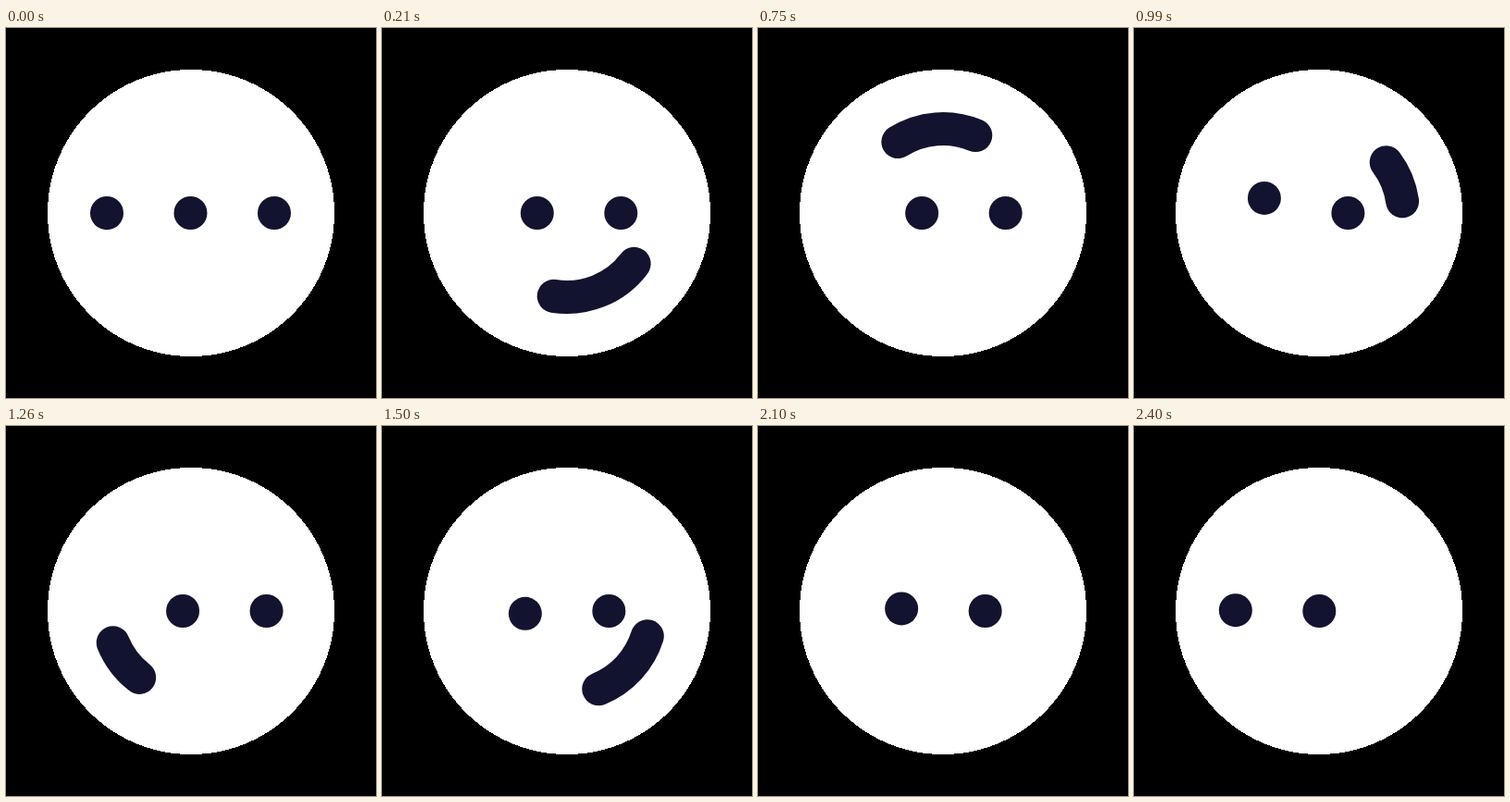
An HTML page for the animation above (4460 ms loop, 400 by 400 pixels).

```html
<!DOCTYPE html>
<html lang="en">
<head>
<meta charset="utf-8">
<title>Juggling dots</title>
<style>
  html, body { margin: 0; width: 100%; height: 100%; overflow: hidden; background: #000; }
  svg { display: block; width: 100vw; height: 100vh; }
</style>
</head>
<body>
<svg viewBox="0 0 400 400">
  <path id="disc" fill="#fff" shape-rendering="crispEdges"/>
  <g fill="#12132f">
    <circle id="left" r="18"/>
    <circle id="right" r="18" cy="200"/>
  </g>
  <path id="arc" fill="none" stroke="#12132f" stroke-width="36" stroke-linecap="round"/>
</svg>
<script>
const LOOP = 4460, TICK = 30, LAST = 80;
const MID = 200, R = 91, DISC = 155;
const START = 0.011, STEP = 0.04982; // throws per tick
const THROWS = 3;                    // the fourth pass has no dot in the air

// Degrees travelled along the half circle, by progress of one throw
const FRONT = [[0.012, 0], [0.103, 52], [0.36, 143], [0.655, 172], [0.908, 179.8], [1, 180]];
const BACK = [[0.012, 0], [0.103, 22], [0.36, 81], [0.655, 143], [0.804, 163], [0.908, 175.6], [0.95, 178.6], [1, 180]];

const [disc, left, right, arc] =
  ["disc", "left", "right", "arc"].map(id => document.getElementById(id));

// Hard-edged disc built from whole pixel rows
function rows(r) {
  let d = "";
  for (let y = -r; y < r; y++) {
    const half = Math.round(Math.sqrt(r * r - (y + 0.5) ** 2));
    d += `M${MID - half} ${MID + y}h${2 * half}v1h${-2 * half}z`;
  }
  return d;
}

// Smooth curve through points, flat at both ends
function curve(pts, x) {
  const n = pts.length - 1;
  if (x <= pts[0][0]) return pts[0][1];
  if (x >= pts[n][0]) return pts[n][1];
  const slope = i => i === 0 || i === n ? 0 :
    (pts[i + 1][1] - pts[i - 1][1]) / (pts[i + 1][0] - pts[i - 1][0]);
  let i = 0;
  while (x > pts[i + 1][0]) i++;
  const [x0, y0] = pts[i], [x1, y1] = pts[i + 1];
  const h = x1 - x0, u = (x - x0) / h, v = 1 - u;
  return v * v * (1 + 2 * u) * y0 + u * u * (3 - 2 * u) * y1 +
    h * u * v * (v * slope(i) - u * slope(i + 1));
}

// Wind-up of the dot about to be thrown: smooth swing out, quick return
function swing(q) {
  const from = 0.42, peak = 0.82, size = 25.5;
  if (q < from) return 0;
  if (q > peak) return size * Math.cos(Math.PI / 2 * (q - peak) / (1 - peak));
  const u = (q - from) / (peak - from);
  return size * u * u * (3 - 2 * u);
}

function rim(deg, side) {
  const a = deg * Math.PI / 180;
  return (MID - R * Math.cos(a)).toFixed(2) + " " + (MID + side * R * Math.sin(a)).toFixed(2);
}

function draw(ms) {
  const tick = Math.min(Math.floor(ms / TICK), LAST);
  const phase = START + tick * STEP;
  const pass = Math.floor(phase), q = phase - pass;
  const side = pass % 2 ? -1 : 1; // 1 throws below, -1 above

  left.setAttribute("cx", MID + 0.5 - R * q);
  left.setAttribute("cy", MID + side * swing(q));
  right.setAttribute("cx", MID + R - R * q);

  arc.style.display = pass < THROWS ? "" : "none";
  const back = Math.min(curve(BACK, q), 179.9);
  const front = Math.max(curve(FRONT, q), back + 0.1);
  arc.setAttribute("d", `M${rim(back, side)} A${R} ${R} 0 0 ${side > 0 ? 0 : 1} ${rim(front, side)}`);
}

disc.setAttribute("d", rows(DISC));
const t0 = performance.now();
function loop() {
  draw((performance.now() - t0) % LOOP);
  requestAnimationFrame(loop);
}
loop();
</script>
</body>
</html>
```
